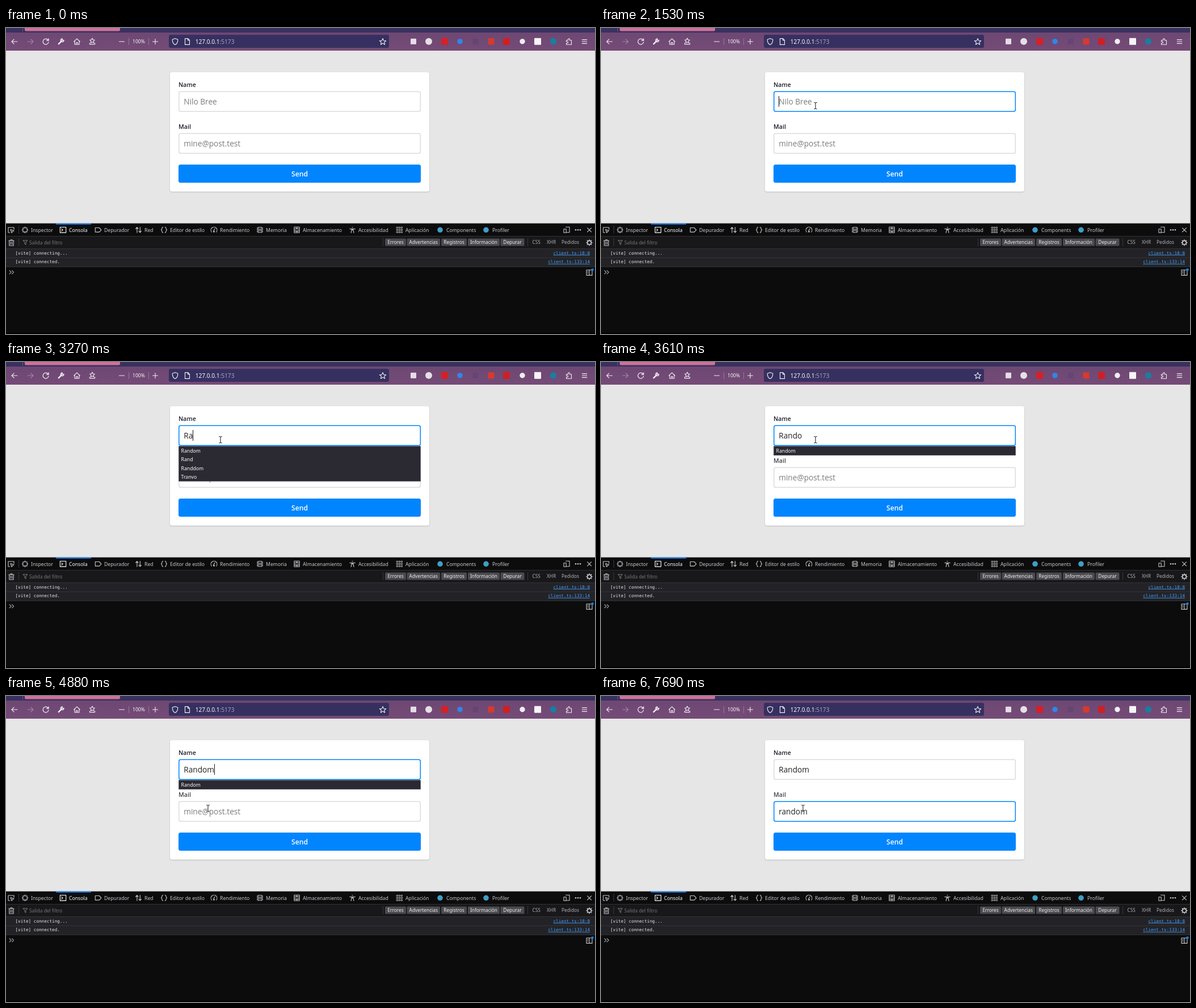
These frames come from a looping animation (1038x540 px, 8 s). An HTML page:

```html
<!DOCTYPE html>
<html lang="es">
<head>
<meta charset="utf-8">
<title>Form demo</title>
<style>
html, body { margin: 0; width: 100%; height: 100%; overflow: hidden; background: #0c0c0d; }
svg { display: block; width: 100vw; height: 100vh; }
text { white-space: pre; }
.ui { font-family: "Noto Sans", sans-serif; }
.form { font-family: "Open Sans", "Noto Sans", sans-serif; }
.mono { font-family: "DejaVu Sans Mono", monospace; font-size: 7.67px; }
</style>
</head>
<body>
<svg id="stage" viewBox="0 0 1038 540" xmlns="http://www.w3.org/2000/svg">
  <defs>
    <linearGradient id="bar" x1="0" x2="0" y1="0" y2="1">
      <stop offset="0" stop-color="#6d4873"/><stop offset="1" stop-color="#754b77"/>
    </linearGradient>
    <filter id="soft" x="-5%" y="-5%" width="110%" height="115%">
      <feDropShadow dx="0" dy="1" stdDeviation="1.2" flood-opacity=".2"/>
    </filter>
  </defs>
  <g id="chrome"></g>
  <g id="page"></g>
  <g id="tools"></g>
  <g id="live"></g>
</svg>
<script>
const $ = id => document.getElementById(id);
const rect = (x, y, w, h, fill, more = '') =>
  `<rect x="${x}" y="${y}" width="${w}" height="${h}" fill="${fill}" ${more}/>`;
const dot = (x, y, r, fill) => `<circle cx="${x}" cy="${y}" r="${r}" fill="${fill}"/>`;
const text = (x, y, size, fill, str, cls = 'ui', more = '') =>
  `<text x="${x}" y="${y}" font-size="${size}" fill="${fill}" class="${cls}" ${more}>${str}</text>`;
const icon = (x, y, d, stroke = '#f1eef4', width = 1.1) =>
  `<path transform="translate(${x} ${y})" d="${d}" fill="none" stroke="${stroke}" stroke-width="${width}" stroke-linecap="round" stroke-linejoin="round"/>`;

const STAR = 'M0-5.5L1.7-1.8L5.7-1.5L2.7 1.2L3.6 5.2L0 3.1L-3.6 5.2L-2.7 1.2L-5.7-1.5L-1.7-1.8Z';
const CROSS = 'M-3.5-3.5L3.5 3.5M3.5-3.5L-3.5 3.5';

function drawChrome() {
  let s = rect(0, 0, 1038, 9, '#39315f') + rect(0, 8, 1038, 32, 'url(#bar)');
  s += rect(33, -4, 168, 9.5, '#cf7199', 'rx="2.5"') + rect(29, 0, 1, 6, '#625a86');
  s += rect(287, 12, 388, 23, '#363060', 'rx="3"');
  s += icon(15, 24, 'M5 0H-5M-.8-4.2L-5 0L-.8 4.2');
  s += icon(43, 24, 'M-5 0H5M.8-4.2L5 0L.8 4.2', '#a486a8');
  s += icon(70, 24, 'M4.4-2.5A5 5 0 1 0 5 1M5-5V-1.8H1.6', '#f1eef4', 1.3);
  s += icon(97, 24, 'M-4.2 4.2L.8-.8', '#f1eef4', 2.4);
  s += icon(97, 24, 'M4.9-2.4A2.8 2.8 0 1 1 2.2-5L1.6-2.2Z', '#f1eef4', 1.5);
  s += icon(125, 24, 'M-5.3 0L0-5.2L5.3 0M-4-.8V5H4V-.8M-1.2 5V1.5H1.2V5');
  s += icon(152, 23, 'M0-5L1.4-2.2L4.4-1.8L2.2.2L2.8 3.2L0 1.8L-2.8 3.2L-2.2.2L-4.4-1.8L-1.4-2.2ZM-4.6 3.5V5.6H4.6V3.5');
  s += icon(204, 24, 'M-4.5 0H4.5') + icon(263, 24, 'M-4.5 0H4.5M0-4.5V4.5');
  s += rect(216, 18, 1, 12, '#94789b') + rect(251, 18, 1, 12, '#94789b');
  s += text(223, 27, 8.6, '#f5f2f7', '100%');
  s += icon(298, 24, 'M0-5.6L4.8-3.8C4.8.8 3.5 4 0 5.6C-3.5 4-4.8.8-4.8-3.8Z');
  s += icon(319.5, 24, 'M-4-5.4H1.2L4-2.6V5.4H-4ZM1-5.2V-2.4H3.8');
  s += text(333.7, 27.8, 10.15, '#f7f6fa', '127.0.0.1<tspan fill="#a5a1bd">:5173</tspan>');
  s += icon(664, 24, STAR);
  // extension buttons
  const round = [[745, 6, '#e4e1e5'], [800, 4.8, '#2f87e6'], [910, 4.7, '#f1eef4'], [964.5, 5.6, '#177fa0']];
  const square = [[718, 10, '#e5dde8'], [773, 12, '#d52027'], [827.5, 10, '#654476'], [855, 11, '#d63a2e'], [882, 12, '#cf1f25'], [937, 12, '#f7f5f8']];
  for (const [x, r, c] of round) s += dot(x, 23.7, r, c);
  for (const [x, w, c] of square) s += rect(x - w / 2, 23.7 - w / 2, w, w, c, 'rx="1"');
  s += icon(992, 24, 'M-4.5-2.2H-1.5V-3.6A1.5 1.5 0 0 1 1.5-3.6V-2.2H4.5V5.2H-4.5V2.8H-3A1.4 1.4 0 0 0-3 0H-4.5Z');
  s += icon(1019.5, 24, 'M-4.2-3.4H4.2M-4.2 0H4.2M-4.2 3.4H4.2');
  $('chrome').innerHTML = s;
}

function drawPage() {
  const box = (id, y) => rect(304.8, y, 425.5, 35, '#fff', `id="${id}" rx="3" stroke="#dcdcdc" stroke-width="1.5"`);
  $('page').innerHTML = rect(0, 40, 1038, 305, '#e6e6e6')
    + rect(289, 78, 457, 210.5, '#fff', 'rx="4" filter="url(#soft)"')
    + text(304, 104, 10.64, '#1b1b2b', 'Name', 'form', 'font-weight="600"')
    + text(304, 178, 10.64, '#1b1b2b', 'Mail', 'form', 'font-weight="600" id="mailLabel"')
    + box('nameBox', 112.2) + box('mailBox', 186.2)
    + text(313.2, 135, 13.68, '#757575', '', 'form', 'id="nameText"')
    + text(313.2, 209, 13.68, '#757575', '', 'form', 'id="mailText"')
    + rect(304, 241, 427, 32, '#0085ff', 'rx="3.5"')
    + text(517.5, 261.6, 12.16, '#fff', 'Send', 'form', 'font-weight="600" text-anchor="middle"');
}

function drawTools() {
  const grey = '#c9c9cc', line = '#38383d';
  let s = rect(0, 345, 1038, 195, '#0c0c0d') + rect(0, 367, 1038, 22, '#18181a')
    + rect(0, 389, 1038, 32.5, '#232327');
  for (const y of [367, 389, 405, 421]) s += rect(0, y, 1038, .8, line);
  s += rect(0, 344.6, 1038, .8, line) + rect(0, 538, 1038, 2, '#000');
  s += rect(22, 349, 1, 14, line) + rect(22, 371, 1, 14, line);
  s += rect(88, 345, 62, 1.8, '#0a84ff');
  s += icon(9, 356.5, 'M5-1V-4.5H-5V4.5H-2M-1-1L1.2 5L2.4 2.4L5 1.2Z', grey);
  const tabs = [
    [44, 'Inspector', 'M-3.6-3.6H3.6V3.6H-3.6ZM0-5.4V-3.6M0 5.4V3.6M-5.4 0H-3.6M5.4 0H3.6'],
    [111, 'Consola', 'M-5.2-4.8H5.2V4.8H-5.2ZM-2.6-2L-.4 0L-2.6 2'],
    [173, 'Depurador', 'M-5.2-3.8H1.8L5.4 0L1.8 3.8H-5.2Z'],
    [244, 'Red', 'M-2.6 4.8V-4.5M-5-2L-2.6-4.6L-.4-2M2.8-4.8V4.5M.4 2L2.8 4.6L5 2'],
    [289, 'Editor de estilo', 'M-1.8-4.8C-5-4.8-2.2-.6-5.2 0C-2.2.6-5 4.8-1.8 4.8M1.8-4.8C5-4.8 2.2-.6 5.2 0C2.2.6 5 4.8 1.8 4.8'],
    [377, 'Rendimiento', 'M-4.2 3.8A5.4 5.4 0 1 1 4.2 3.8M-1 2.5L1.4-2M-1 3A1 1 0 1 0 1 3A1 1 0 1 0-1 3'],
    [458, 'Memoria', 'M-3.4-4.5H3.4V4.5H-3.4ZM-1.2-2V2M1.2-2V2M-5.3-3H-3.4M-5.3 0H-3.4M-5.3 3H-3.4M5.3-3H3.4M5.3 0H3.4M5.3 3H3.4'],
    [523, 'Almacenamiento', 'M-4.6-5H4.6V5H-4.6ZM-4.6-1.5H4.6M-4.6 1.8H4.6M-1.5-3.2H1.5M-1.5 3.4H1.5'],
    [621, 'Accesibilidad', 'M-4.8-1.8H4.8M0-1.8V1M-2.4 5.2L-1.4-1.5H1.4L2.4 5.2M-.6-4.6H.6'],
    [704, 'Aplicación', [-4, 0, 4].map(y => [-4, 0, 4].map(x => `M${x - 1} ${y - 1}h2v2h-2Z`).join('')).join('')],
    [776, 'Components'], [857, 'Profiler']
  ];
  for (const [x, name, d] of tabs) {
    const on = name === 'Consola';
    s += d ? icon(x - 10.5, 356.3, d, on ? '#fff' : grey, name === 'Aplicación' ? .8 : 1.1) : dot(x - 11, 356.3, 4.8, '#3f9fc4');
    s += text(x, 359.8, 8.7, on ? '#fff' : grey, name);
  }
  s += icon(988, 356.3, 'M-1.5-5H5V4.5H-.5M-5-1.5H-.8V5H-5Z', grey);
  for (const x of [1004, 1008, 1012]) s += dot(x, 356.3, 1.3, grey);
  s += icon(1028, 356.3, CROSS, grey);
  // filter row
  s += icon(9.5, 378.8, 'M-4.6-3.6H4.6M-1.5-3.6V-5H1.5V-3.6M-3.7-3.6V5.2H3.7V-3.6M-1.3-1.2V3M1.3-1.2V3', grey);
  s += icon(34, 378.5, 'M-3.8-3.6H3.8L1-.2V3.8L-1 2.4V-.2Z', '#8a8a90', .9);
  s += text(41, 381.6, 8.4, '#76767c', 'Salida del filtro');
  s += rect(664, 371, 1, 14, line) + rect(919, 371, 1, 14, line);
  const chips = [[668, 37, 'Errores'], [706.5, 58.5, 'Advertencias'], [767, 45, 'Registros'], [814, 56, 'Información'], [871.5, 42, 'Depurar']];
  for (const [x, w, name] of chips)
    s += rect(x, 371.5, w, 13, '#4a4a4f', 'rx="1.5"') + text(x + w / 2, 381.4, 8.3, '#f0f0f2', name, 'ui', 'text-anchor="middle"');
  for (const [x, name] of [[927.5, 'CSS'], [953, 'XHR'], [979, 'Pedidos']]) s += text(x, 381.4, 8.3, '#b1b1b3', name);
  let gear = 'M-3.3 0A3.3 3.3 0 1 0 3.3 0A3.3 3.3 0 1 0-3.3 0';
  for (let k = 0; k < 8; k++) {
    const c = Math.cos(k * Math.PI / 4), n = Math.sin(k * Math.PI / 4);
    gear += `M${3.6 * c} ${3.6 * n}L${5 * c} ${5 * n}`;
  }
  s += icon(1028, 378.7, gear, grey, 1.6);
  // console output
  const row = (y, msg, link) => text(16.5, y, 7.67, '#e4e4e8', msg, 'mono')
    + text(1029, y, 7.67, '#45a1ff', link, 'mono', 'text-anchor="end" text-decoration="underline"');
  s += row(399.6, '[vite] connecting...', 'client.ts:18:8') + row(415.4, '[vite] connected.', 'client.ts:133:14');
  s += icon(10, 431, 'M-3.8-3L-.8 0L-3.8 3M.6-3L3.6 0L.6 3', '#a0a0a5');
  s += icon(1028, 431.7, 'M-5-4.7H5V4.7H-5ZM0-4.7V4.7M-3.2-2H-2M-3.2.5H-2', grey) + dot(1033.5, 426.5, 2.3, '#0a84ff');
  $('tools').innerHTML = s;
}

function drawLive() {
  const names = ['Random', 'Rand', 'Randdom', 'Tranvo'];
  $('live').innerHTML = `<g id="list">${rect(304.5, 148.7, 426, 16, '#2b2a33', 'id="listBox" stroke="#55545f" stroke-width=".8"')}`
    + names.map((n, i) => text(308.5, 160.2 + i * 15.25, 8.7, '#fbfbfe', n, 'ui', 'data-item')).join('') + '</g>'
    + rect(313, 120, 1, 19, '#111', 'id="caret"')
    + `<g id="beam">${icon(0, 0, 'M-2.3-5.6Q0-5.6 0-4.4Q0-5.6 2.3-5.6M0-4.4V4.8M-2.3 6Q0 6 0 4.8Q0 6 2.3 6', '#fff', 2)}`
    + `${icon(0, 0, 'M-2.3-5.6Q0-5.6 0-4.4Q0-5.6 2.3-5.6M0-4.4V4.8M-2.3 6Q0 6 0 4.8Q0 6 2.3 6', '#111', 1)}</g>`
    + '<path id="arrow" d="M0 0V12L2.8 9.4L4.7 13.6L6.5 12.8L4.6 8.7H8.4Z" fill="#111" stroke="#fff" stroke-width=".8"/>';
}

drawChrome(); drawPage(); drawTools(); drawLive();
const items = document.querySelectorAll('[data-item]');

// latest value whose start time has passed
const at = (t, keys) => keys.reduce((v, k) => t >= k[0] ? k[1] : v, keys[0][1]);
const clamp = v => Math.max(0, Math.min(1, v));
const smooth = v => v * v * (3 - 2 * v);
const lerp = (a, b, k) => a + (b - a) * k;

const nameKeys = [[0, ''], [2930, 'R'], [3210, 'Ra'], [3340, 'Ran'], [3470, 'Rand'], [3610, 'Rando'], [3670, 'Random']];
const mailKeys = [[0, ''], [5760, 'r'], [5960, 'ra'], [6090, 'ran'], [6160, 'rand'], [6290, 'rando'], [6360, 'random']];
const listKeys = [[0, 0], [3000, 3], [3270, 4], [3400, 3], [3610, 1], [5040, 0]];
const caretKeys = [[0, 0], [1400, 1], [1930, 0], [2460, 1], [3610, 0], [3670, 1], [4070, 0], [4570, 1],
  [5560, 0], [5760, 1], [6360, 0], [6420, 1], [6620, 0], [7170, 1], [7690, 0]];
const nameFocus = [[0, 0], [1400, .5], [1460, .8], [1530, 1], [5040, .4], [5160, 0]];
const mailFocus = [[0, 0], [5040, .6], [5160, 1]];

function pointer(t) {
  const step = (from, to, n) => clamp(Math.floor((t - from) / (to - from) * n + 1e-6) / n);
  if (t < 1260) {
    const k = smooth(.06 + .94 * step(430, 1190, 11));
    return [lerp(963, 379, k), lerp(532, 140, k)];
  }
  if (t < 4340) return [378, t < 1330 ? 138 : 137];
  const k = smooth((1 + 7 * step(4340, 4880, 7)) / 8);
  return [lerp(378, 356, k), lerp(137, 198, k)];
}

function field(id, value, hint, focus) {
  const el = $(id + 'Text');
  if (el.textContent !== (value || hint)) el.textContent = value || hint;
  el.setAttribute('fill', value ? '#222' : '#7c7c7c');
  const mix = [0, 133, 255].map(c => Math.round(lerp(220, c, focus)));
  $(id + 'Box').setAttribute('stroke', `rgb(${mix})`);
  return 313.2 + (value ? el.getComputedTextLength() : 0);
}

const show = (el, on) => el.setAttribute('visibility', on ? 'visible' : 'hidden');

function render(t) {
  const inMail = t >= 5040;
  const nameEnd = field('name', at(t, nameKeys), 'Nilo Bree', at(t, nameFocus));
  const mailEnd = field('mail', at(t, mailKeys), 'mine@post.test', at(t, mailFocus));
  $('mailLabel').setAttribute('fill', t < 3000 ? '#1b1b2b' : '#41414a');

  const caret = $('caret');
  caret.setAttribute('x', Math.floor(inMail ? mailEnd : nameEnd));
  caret.setAttribute('y', inMail ? 194 : 120);
  show(caret, at(t, caretKeys));

  const rows = at(t, listKeys);
  show($('listBox'), rows);
  $('listBox').setAttribute('height', rows * 15.25 + .6);
  items.forEach((el, i) => show(el, i < rows));

  const [x, y] = pointer(t);
  const over = x > 304 && x < 731 && (y > 111 && y < 148 || y > 185 && y < 222);
  for (const id of ['beam', 'arrow']) $(id).setAttribute('transform', `translate(${x} ${y})`);
  show($('beam'), t >= 430 && over);
  show($('arrow'), t >= 430 && !over);
}

const start = performance.now();
function tick() {
  render((performance.now() - start) % 8000);
  requestAnimationFrame(tick);
}
tick();
</script>
</body>
</html>
```
